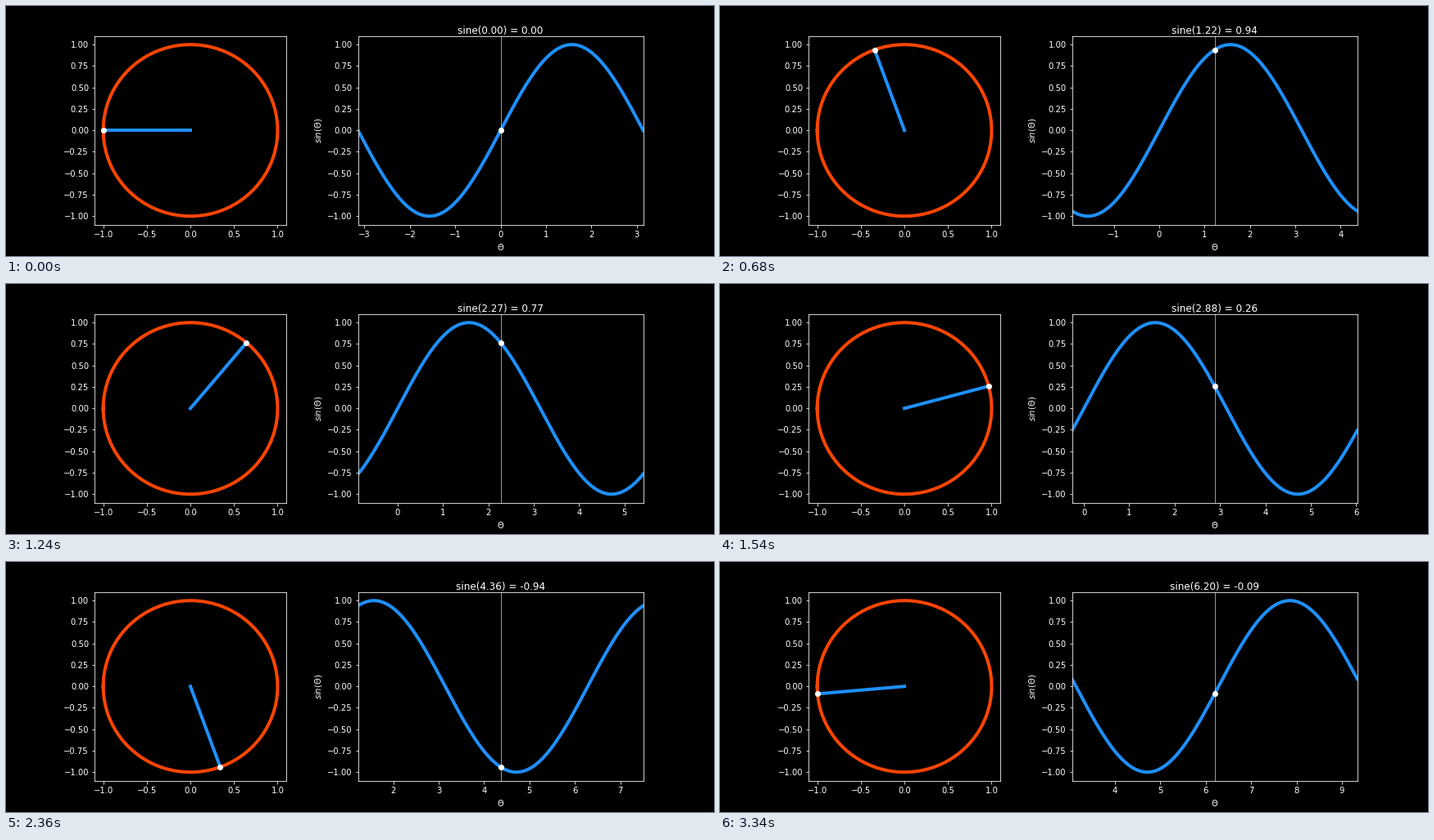
A matplotlib script that plays this animation: 864x306 px, repeating every 3440 ms.

```python
import numpy as np
import matplotlib.pyplot as plt
from matplotlib.animation import FuncAnimation

WIDTH, HEIGHT, DPI = 864, 306, 72
STEPS = 72      # one step per 5 degrees
TICK = 20       # ms

plt.style.use("dark_background")
plt.rcParams.update({"font.family": "DejaVu Sans", "font.size": 10})

fig = plt.figure(figsize=(WIDTH / DPI, HEIGHT / DPI), dpi=DPI)


def add_axes(left, right):
    """Axes between two pixel columns, sharing the same vertical extent."""
    axes = fig.add_axes((left / WIDTH, 0.125, (right - left) / WIDTH, 0.755))
    axes.set_ylim(-1.1, 1.1)
    return axes


def add_dot(axes):
    return axes.plot([], [], "o", color="white", markersize=6, zorder=4)[0]


circle_ax = add_axes(108, 342.1)
circle_ax.set_xlim(-1.1, 1.1)
turn = np.linspace(0, 2 * np.pi, 200)
circle_ax.plot(-np.cos(turn), np.sin(turn), color="orangered", lw=4)
radius, = circle_ax.plot([], [], color="dodgerblue", lw=4)
rim_dot = add_dot(circle_ax)

wave_ax = add_axes(429.6, 777.6)
wave_ax.set_xlabel(r"$\Theta$")
wave_ax.set_ylabel(r"$sin(\Theta)$")
wave, = wave_ax.plot([], [], color="dodgerblue", lw=4)
cursor = wave_ax.axvline(0, color="white", lw=1, alpha=0.6)
wave_dot = add_dot(wave_ax)
title = wave_ax.set_title("", fontsize=12, pad=3)

# Every third step is held for five ticks, as is the last one.
holds = [5 if i % 3 == 1 or i == STEPS - 1 else 1 for i in range(STEPS)]
timeline = np.repeat(np.arange(STEPS), holds)


def update(frame):
    theta = 2 * np.pi * timeline[frame] / STEPS
    x, y = -np.cos(theta), np.sin(theta)
    radius.set_data([0, x], [0, y])
    rim_dot.set_data([x], [y])

    span = np.linspace(theta - np.pi, theta + np.pi, 200)
    wave.set_data(span, np.sin(span))
    wave_ax.set_xlim(span[0], span[-1])
    cursor.set_xdata([theta, theta])
    wave_dot.set_data([theta], [y])
    title.set_text(f"sine({theta:.2f}) = {y:.2f}")
    return radius, rim_dot, wave, cursor, wave_dot, title


anim = FuncAnimation(fig, update, frames=len(timeline), interval=TICK,
                     repeat=True, repeat_delay=0, blit=False)
plt.show()
```
